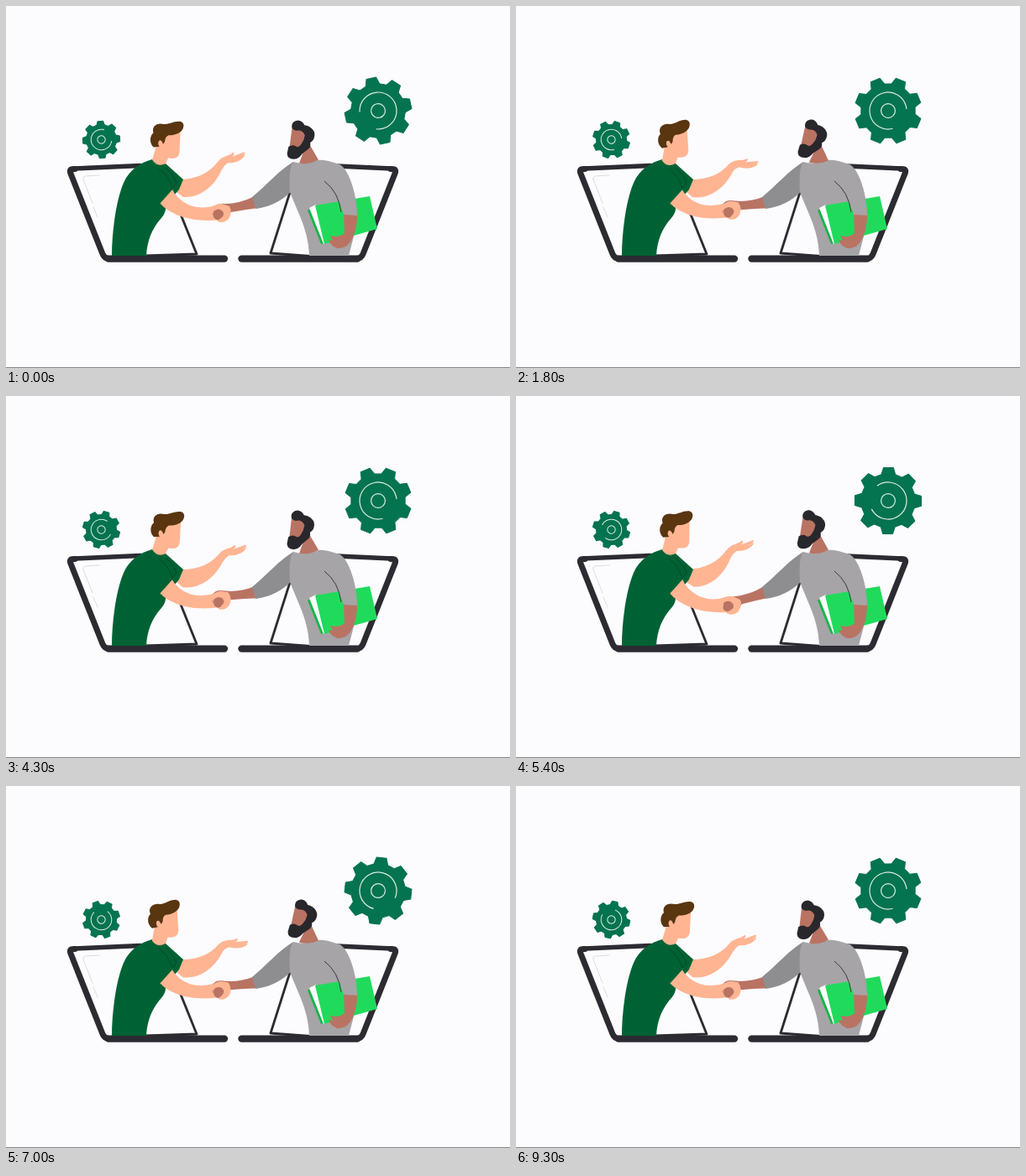
Write an HTML page that moves like this. It is 600 by 432 pixels and loops after 9400 ms.

```html
<!DOCTYPE html>
<html lang="en">
<head>
<meta charset="utf-8">
<title>Handshake</title>
<style>
html, body { margin: 0; width: 100%; height: 100%; overflow: hidden; background: #fcfbfe; }
svg { display: block; width: 600px; height: 432px; }
.frame { fill: none; stroke: #2c2b31; stroke-linecap: round; stroke-linejoin: round; }
.top { stroke-width: 5.5; }
.side { stroke-width: 7; }
.bar { stroke-width: 8.4; }
.stand { stroke-width: 2.8; }
.gear { fill: #04734f; }
.ring { fill: none; stroke: #d9ece4; }
.peach { fill: #ffb592; }
.brown { fill: #b97363; }
.green { fill: #006234; }
.grey { fill: #a6a4a7; }
.sleeve { fill: #8e8d8f; }
.hair { fill: #593510; }
.dark { fill: #28272c; }
</style>
</head>
<body>
<svg viewBox="0 0 600 432">
  <rect width="600" height="432" fill="#fcfbfe"/>
  <rect y="431" width="600" height="1" fill="#85858a"/>

  <g id="smallGear"></g>
  <g id="bigGear"></g>

  <!-- laptops -->
  <g class="frame">
    <path class="top" d="M160 190.500L81 194"/>
    <path class="side" d="M82 194.500L79 194.700Q75 195 77 200L115 296Q117 301 122 301.500"/>
    <path class="bar" d="M122 301.600H260"/>
    <path class="stand" d="M190 204L227 296L166 298"/>
    <path stroke="#dcdbe0" d="M111 202L94 203Q91 204 92 207L103 235M104 240L109 252"/>
  </g>
  <g class="frame">
    <path class="top" d="M394 191L459 194"/>
    <path class="side" d="M458 194.500L461 194.700Q465 195 463 200L425 296Q423 301 418 301.500"/>
    <path class="bar" d="M418 301.600H280.500"/>
    <path class="stand" d="M341 213L315 295L362 298.500"/>
  </g>

  <!-- left person -->
  <g id="backArm">
    <path class="peach" d="M205 207Q236 207 252 186L259 190Q252 209 239 219Q226 229 211 228L203 222Z"/>
    <path id="palm" class="peach" d="M250 189Q254 182 262 180Q268 179 272 176Q274 178 270 181L284 177Q287 177 284 180L277 183L285 180Q286 182 279 186Q272 189 264 188Q259 191 257 195Z"/>
  </g>
  <path class="green" d="M174 183C160 187 147 195 140 211C131 232 126 270 126 298H167C168 280 174 265 185 253Q191 246 190 238L206 219L211 207L190 188Z"/>
  <g id="leftHead">
    <path class="peach" d="M181 155L174 184Q180 193 190 188L193 181Q205 183 206 174L206 149L184 151Z"/>
    <path class="hair" d="M175 169C169 164 170 155 174 152C171 144 178 139 186 141C193 141 198 136 206 137Q211 139 209 145C207 151 199 154 192 154Q188 156 188 162L186 165Q184 159 181 161Q179 165 182 168Z"/>
  </g>
  <g id="leftArm">
    <path class="peach" d="M197 217Q203 231 219 238Q234 243 249 238L256 255Q232 258 211 252Q192 246 182 234Z"/>
  </g>
  <path class="green" d="M178 190Q192 202 200 217L183 236Q171 226 166 206Z"/>
  <path fill="none" stroke="#02472b" d="M190 193Q200 202 203 211L198 217Q193 202 182 194"/>

  <!-- right person -->
  <g id="rightArm">
    <path class="brown" d="M296 227Q278 236 261 236Q250 235 247 241L246 249Q252 258 260 254L268 246Q285 243 300 241Z"/>
  </g>
  <path class="sleeve" d="M342 186C326 195 308 216 293 228L297 242Q322 239 340 221Z"/>
  <path class="grey" d="M342 186Q336 194 338 222C347 246 360 267 361 298H408C413 278 419 260 418 248C416 224 409 195 397 189Q380 183 371 184Q356 190 342 186Z"/>
  <g id="rightHead">
    <path class="brown" d="M342 145L338 169L354 175L349 187Q360 190 372 184L362 165L358 148Z"/>
    <path class="dark" d="M342 145C341 138 346 136 350 136Q355 137 357 142Q363 143 366 147Q370 151 368 157Q367 161 363 163Q364 168 360 171L353 176Q349 182 343 182Q335 182 335 175L337 167Q342 164 346 167Q349 169 352 165Q356 160 357 154Q355 148 349 148Q345 149 342 145Z"/>
  </g>
  <g>
    <path fill="#17b64a" d="M359 244L365 240L379 283L375 284Z"/>
    <path fill="#fff" d="M361 241L369 237L381 282L378 284Z"/>
    <path fill="#20db5b" d="M368 238L433 227L442 266L379 284Z"/>
    <path class="brown" d="M402 247L418 249Q418 265 413 276Q406 291 394 289Q386 286 384 279L389 280L386 274Q396 277 403 271Z"/>
    <path class="grey" d="M379 211Q393 222 402 249L418 250C418 225 409 197 397 189Z"/>
    <path fill="none" stroke="#39383c" d="M379 209Q396 222 399 246"/>
  </g>

  <g id="fingers">
    <path class="peach" d="M243 241Q250 236 257 236L266 239Q270 246 265 254Q259 260 252 257Z"/>
    <path class="brown" d="M247 245Q253 240 258 245Q261 250 256 253Q251 258 247 252Z"/>
  </g>
</svg>
<script>
const LOOP = 9400, STEP = 100, TURN = 2 * Math.PI;
const el = id => document.getElementById(id);

function gearPath(r) {
  const pts = [];
  for (let i = 0; i < 8; i++) {
    for (const [deg, k] of [[-15, .81], [-8.5, 1], [8.5, 1], [15, .81]]) {
      const a = (i * 45 + deg - 90) * Math.PI / 180;
      pts.push((r * k * Math.cos(a)).toFixed(2) + " " + (r * k * Math.sin(a)).toFixed(2));
    }
  }
  return "M" + pts.join("L") + "Z";
}

// The outer ring is open for `gap` degrees and begins at angle `from`.
function buildGear(id, r, width, from, gap) {
  el(id).innerHTML =
    `<path class="gear" d="${gearPath(r)}" stroke="#04734f" stroke-width="1" stroke-linejoin="round"/>` +
    `<circle class="ring" r="${r * .21}" stroke-width="${width}"/>` +
    `<circle class="ring" r="${r * .55}" stroke-width="${width}" pathLength="360" ` +
    `stroke-dasharray="${360 - gap} ${gap}" transform="rotate(${from})"/>`;
}

const place = (id, x, y, deg) =>
  el(id).setAttribute("transform", `translate(${x} ${y}) rotate(${deg})`);
const swing = (id, deg, x, y, dy = 0) =>
  el(id).setAttribute("transform", `translate(0 ${dy}) rotate(${deg} ${x} ${y})`);

function draw(t) {
  const sway = Math.cos(TURN * (t + 600) / 5000);
  const shake = Math.sin(TURN * t / 2500);

  place("bigGear", 443, 125, t * .144 - 12);
  place("smallGear", 113.5, 159.5, -t * .163 - 3);

  swing("leftHead", 3.5 * sway, 186, 186);
  swing("rightHead", -3 * sway, 360, 185);
  swing("backArm", -3.2 * shake, 206, 217);
  swing("palm", -7 * sway, 255, 189);

  swing("leftArm", 3 * shake, 190, 228);
  swing("rightArm", -5.5 * shake, 297, 234);
  swing("fingers", 10 * shake, 256, 247, 3.2 * shake);
}

buildGear("bigGear", 40, 1.2, 188, 80);
buildGear("smallGear", 22.3, 1, 10, 80);

const start = performance.now();
function tick() {
  const t = (performance.now() - start) % LOOP;
  draw(Math.floor(t / STEP) * STEP);
  requestAnimationFrame(tick);
}
draw(0);
requestAnimationFrame(tick);
</script>
</body>
</html>
```
